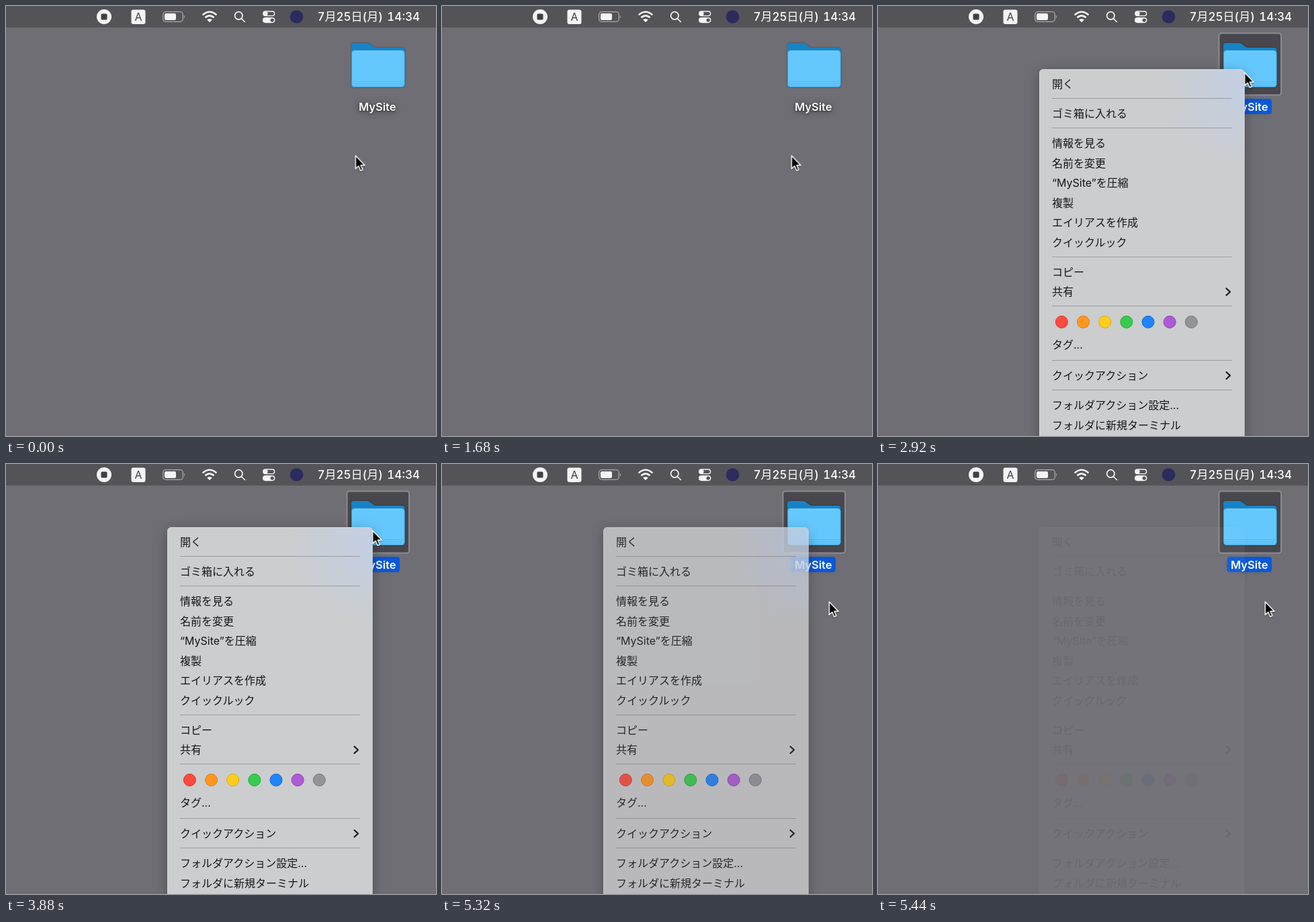
These frames come from a looping animation (640x640 px, 5.48 s). An HTML page:

```html
<!DOCTYPE html>
<html lang="ja">
<head>
<meta charset="utf-8">
<title>Folder context menu</title>
<style>
  html, body { margin: 0; width: 100%; height: 100%; overflow: hidden; background: #6f6e74; }
  svg { display: block; width: 100vw; height: 100vh; }
  text { font: 16px Inter, "Noto Sans CJK JP", sans-serif; }

  .clock text { fill: #fff; font-size: 17px; font-weight: 500; font-variant-numeric: tabular-nums; }
  .label { fill: #fff; font-size: 16.5px; font-weight: 600; text-anchor: middle; }
  .shade { filter: drop-shadow(0 1px 1px rgba(0, 0, 0, .5)) drop-shadow(0 1px 4px rgba(0, 0, 0, .5)); }
  .folder { filter: drop-shadow(0 .5px 1px rgba(0, 0, 0, .4)); }
  .panel { filter: drop-shadow(0 4px 9px rgba(0, 0, 0, .3)); }

  .selected, .menu, .cursor { animation: 5480ms linear infinite; }
  .selected { animation-name: select; }
  .menu { animation-name: menu; }
  .cursor { animation-name: move; filter: drop-shadow(0 1px 1px rgba(0, 0, 0, .35)); }

  @keyframes select {
    0% { opacity: 0; animation-timing-function: step-end; }
    51.82%, 100% { opacity: 1; }
  }
  @keyframes menu {
    0% { opacity: 0; animation-timing-function: step-end; }
    51.82%, 96.53% { opacity: 1; }
    99.45%, 100% { opacity: 0; }
  }
  @keyframes move {
    0%, 30.66% { transform: translate(520.3px, 222.7px); animation-timing-function: ease-in-out; }
    39.42%, 86.86% { transform: translate(545.6px, 99px); animation-timing-function: ease-in-out; }
    95.62%, 100% { transform: translate(576.3px, 205px); }
  }
</style>
</head>
<body>
<svg viewBox="0 0 640 640">
  <defs>
    <radialGradient id="glow" gradientUnits="userSpaceOnUse" cx="540" cy="120" r="120">
      <stop stop-color="#c3cfe2"/>
      <stop offset="1" stop-color="#c3cfe2" stop-opacity="0"/>
    </radialGradient>
  </defs>

  <rect width="640" height="640" fill="#6f6e74"/>
  <rect width="640" height="32" fill="#545358"/>

  <!-- status icons -->
  <g fill="#f4f4f5">
    <circle cx="146" cy="16" r="11"/>
    <rect x="141.5" y="11.5" width="9" height="9" rx="1.5" fill="#3f3e43"/>
    <rect x="186.5" y="5.5" width="21" height="21.5" rx="3"/>
    <text x="197" y="22" text-anchor="middle" fill="#3f3e43">A</text>
    <rect x="233.7" y="8.7" width="29.6" height="14.6" rx="4" fill="none" stroke="#aaa9ad" stroke-width="1.3"/>
    <rect x="236" y="11" width="17" height="10" rx="2"/>
    <path d="M265 13.5q2.4 2.5 0 5z" fill="#aaa9ad"/>
    <g fill="none" stroke="#f4f4f5" stroke-width="2.5">
      <path d="M292.6 13.4q10.4-9.400 20.8 0"/>
      <path d="M296.4 17.3q6.6-5.800 13.2 0"/>
    </g>
    <path d="M299.2 20.4q3.8-3 7.6 0L303 24.2z"/>
    <g fill="none" stroke="#f4f4f5" stroke-width="1.7" stroke-linecap="round">
      <circle cx="346.3" cy="14.4" r="5.7"/>
      <path d="M350.5 18.8L355.4 23.5"/>
    </g>
    <rect x="382.8" y="8" width="16.8" height="6.6" rx="3.3" fill="none" stroke="#f4f4f5" stroke-width="1.4"/>
    <circle cx="386.3" cy="11.3" r="3.3"/>
    <rect x="382" y="17" width="18.4" height="8.200" rx="4.1"/>
    <circle cx="396.2" cy="21.1" r="2.7" fill="#545358"/>
    <circle cx="432.5" cy="16" r="9.8" fill="#2c2b5e"/>
  </g>
  <g class="clock">
    <text x="463.5" y="21.5">7月25日(月)</text>
    <text x="616" y="21.5" text-anchor="end">14:34</text>
  </g>

  <!-- desktop folder -->
  <text class="label shade" x="552.7" y="155.5">MySite</text>
  <g class="selected">
    <rect x="507.5" y="40.5" width="92.5" height="92" rx="3.5" fill="#48474d" stroke="#8b8a8f" stroke-width="2"/>
    <rect x="519.5" y="138" width="66.5" height="23" rx="4" fill="#0b58da"/>
    <text class="label" x="552.7" y="155.5">MySite</text>
  </g>
  <g class="folder">
    <path d="M514 117V59q0-4 4-4h19q3 0 5 2l4 3q2 2 5 2h39q3.500 0 3.500 4v51z" fill="#1683c6"/>
    <rect x="514.400" y="66.200" width="78.800" height="54.400" rx="4" fill="#65c8fd" stroke="#359bd4" stroke-width=".9"/>
    <path d="M517.500 67.100h72.500" stroke="#8edaff" stroke-width=".8"/>
    <path d="M515 112.500h77.500M515 115.500h77.500M515.500 118.200h76.500" stroke="#4fb2ea" stroke-width=".7"/>
  </g>

  <g class="menu" id="menu">
    <g class="panel">
      <rect x="240" y="94" width="305.500" height="570" rx="6" fill="#cbcdce"/>
    </g>
    <rect x="240" y="94" width="305.500" height="570" rx="6" fill="url(#glow)"/>
    <rect x="240.500" y="94.500" width="304.500" height="569" rx="5.500" fill="none" stroke="#dcdee0" stroke-opacity=".6"/>
  </g>

  <path class="cursor" d="M0 0V19.500L4.500 15.400L7.500 22.200L10.600 20.900L7.700 14.200H13.600Z"
        stroke="#fff" stroke-width="1.500" stroke-linejoin="round"/>
</svg>
<script>
  const menu = document.getElementById('menu');

  function add(tag, attrs, text = '') {
    const el = document.createElementNS('http://www.w3.org/2000/svg', tag);
    for (const key in attrs) el.setAttribute(key, attrs[key]);
    el.textContent = text;
    menu.append(el);
  }

  const items = [
    ['開く', 116], ['ゴミ箱に入れる', 160], ['情報を見る', 204.5], ['名前を変更', 234],
    ['“MySite”を圧縮', 263.5], ['複製', 293], ['エイリアスを作成', 322.5], ['クイックルック', 352],
    ['コピー', 396], ['共有', 425.5], ['タグ...', 504.5], ['クイックアクション', 550],
    ['フォルダアクション設定...', 594.5], ['フォルダに新規ターミナル', 624]
  ];
  for (const [name, y] of items) add('text', { x: 259, y: y + 5.8, fill: '#161618' }, name);

  for (const y of [137.5, 181.5, 373.5, 446.5, 527.5, 571.5]) {
    add('path', { d: `M259 ${y}H526.5`, stroke: '#9b9d9f' });
  }

  for (const y of [425.5, 550]) {
    add('path', {
      d: `M518.5 ${y - 5}l5.5 5l-5.5 5`, fill: 'none', stroke: '#161618',
      'stroke-width': 2.2, 'stroke-linecap': 'round', 'stroke-linejoin': 'round'
    });
  }

  const tags = [
    ['#ff4a40', '#dc342b'], ['#fe9722', '#de7d10'], ['#fdcd1c', '#dcae10'], ['#37cc4e', '#20ab37'],
    ['#2183fb', '#0f66d8'], ['#ad5bd5', '#8f41b8'], ['#929598', '#77797c']
  ];
  tags.forEach(([fill, stroke], i) => add('circle', { cx: 273.4 + 32.15 * i, cy: 470.3, r: 9, fill, stroke }));
</script>
</body>
</html>
```
